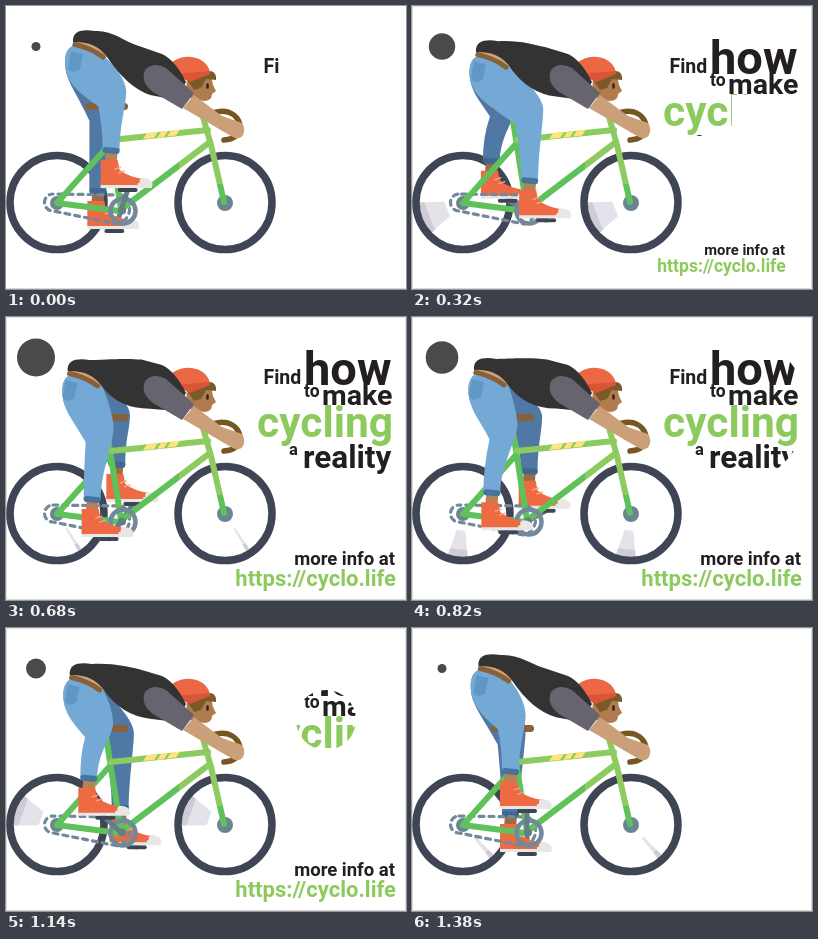
Animation, 400 px wide and 283 px high, one loop 1420 ms. Source, as an HTML page:

```html
<!DOCTYPE html>
<html lang="en">
<head>
<meta charset="utf-8">
<title>Cycling</title>
<style>
html, body { margin: 0; width: 100%; height: 100%; overflow: hidden; background: #fff; }
svg { display: block; width: 100vw; height: 100vh; }
text { font-family: Roboto, "Open Sans", sans-serif; font-weight: 700; fill: #231f20; }
.green { fill: #8dca5e; }
.line { fill: none; stroke-linecap: round; stroke-linejoin: round; }
</style>
</head>
<body>
<svg viewBox="0 0 400 283">
  <defs>
    <linearGradient id="tubePaint" gradientUnits="userSpaceOnUse" x1="113" y1="0" x2="204" y2="0">
      <stop offset=".66" stop-color="#5fc15a"/><stop offset=".66" stop-color="#8dcb60"/>
    </linearGradient>
    <linearGradient id="forkPaint" gradientUnits="userSpaceOnUse" x1="0" y1="110" x2="0" y2="197">
      <stop offset=".78" stop-color="#8dcb60"/><stop offset=".78" stop-color="#5fc15a"/>
    </linearGradient>
    <clipPath id="reveal"><path id="revealShape"/></clipPath>
    <g id="wheel">
      <g class="flap">
        <path d="M17-8L43-18Q47 0 43 18L17 8Z" fill="#e4e3ea"/>
        <path d="M36-15.500L43-18Q47 0 43 18L36 15.500Z" fill="#d0ccd6"/>
      </g>
      <circle r="47" fill="none" stroke="#3f4554" stroke-width="7.5"/>
    </g>
    <g id="shoe">
      <path d="M-25-28h17l2 10q9 7 24 9l2 5h-45z" fill="#ee6a43"/>
      <path d="M-25-5h39q-1-5 4-5q8 1 9 6l-1 4h-51z" fill="#e9e6e6"/>
      <path d="M-25-6h37v3h-37z" fill="#ee6a43"/>
      <path class="line" d="M-11-19l6-2M-7-15l6-2" stroke="#f6a78c" stroke-width="1.3"/>
    </g>
    <path id="crank" class="line" d="M0 0V-21" stroke="#647d89" stroke-width="5"/>
    <path id="pedal" class="line" d="M-8 0H8" stroke="#3f4554" stroke-width="4"/>
  </defs>
  <rect width="400" height="283" fill="#fff"/>
  <path d="M0 282.5H400" stroke="#d8d8d8"/>
  <path id="edge" d="M.5 283V.5H399.5V283" fill="none" stroke="#dcdcdc"/>
  <circle id="badge" cx="30" cy="40.5" fill="#4a4a4a"/>

  <use href="#wheel" x="51" y="196.5"/>
  <use href="#wheel" x="219" y="196.5"/>

  <path id="farSkin" class="line" stroke="#9c6a43" stroke-width="12"/>
  <path id="farLeg" fill="#5078a4"/>
  <path id="farCuff" class="line" stroke="#3f678f" stroke-width="6"/>
  <use id="farCrank" href="#crank"/>
  <use id="farPedal" href="#pedal"/>
  <use id="farShoe" href="#shoe"/>

  <path id="chain" class="line" d="M47 188L116 189A16 16 0 0 1 112 218L47 205A8.5 8.5 0 0 1 47 188" stroke="#71899a" stroke-width="3.2" stroke-dasharray="5 5"/>
  <g fill="#6c8492"><circle cx="51" cy="197" r="7"/><circle cx="219" cy="197" r="8"/></g>
  <g class="line" stroke="#5fc15a" stroke-width="6">
    <path d="M99 102L115 203M103 139L51 197L113 205"/>
    <path d="M113 205L204 136" stroke="url(#tubePaint)"/>
    <path d="M105 134L202 124" stroke="#8dcb60"/>
    <path d="M197 111L205 139L218 196" stroke="url(#forkPaint)"/>
  </g>
  <path d="M141 127l11-1-4 6-11 1zM155 126l7-1-4 6-7 1zM165 124.500l9-1-4 6-9 1z" fill="#ffe47d"/>
  <rect x="79" y="97" width="43" height="7" rx="3.500" fill="#87613a"/>
  <circle cx="117" cy="205" r="12.500" fill="none" stroke="#71899a" stroke-width="4.500"/>
  <circle cx="116" cy="204.500" r="4" fill="#647d89"/>
  <use id="nearCrank" href="#crank"/>
  <use id="nearPedal" href="#pedal"/>

  <path class="line" d="M199 111Q211 103 222 106C238 111 239 133 218 134" stroke="#765721" stroke-width="5.500"/>

  <path id="nearSkin" class="line" stroke="#b98055" stroke-width="12"/>
  <use id="nearShoe" href="#shoe"/>
  <path id="back" fill="#d2a174"/>
  <path id="nearLeg" fill="#74a9d6"/>
  <path id="nearCuff" class="line" stroke="#45759f" stroke-width="6"/>
  <path id="pocket" fill="#5f97c6"/>
  <path id="belt" class="line" stroke="#87613a" stroke-width="5"/>

  <path d="M181 70L205 69L207 79L210 85L206 88Q206 95 198 95L180 91Z" fill="#b07b4d"/>
  <path d="M182 75L205 65Q211 67 210 74L200 73L195 82L188 84Z" fill="#7a5a28"/>
  <path class="line" d="M201.500 78.500v3" stroke="#2e2620" stroke-width="2.500"/>
  <path d="M162 62C168 47 199 46 204 66L183 74Z" fill="#ec6743"/>
  <path d="M168 68L204 65V68L184 76Z" fill="#d95535"/>
  <path id="shirt" fill="#333"/>
  <path d="M188 89L216 110L236 117Q240 123 237 129Q233 135 225 130L177 102Z" fill="#cba079"/>
  <path d="M139 64Q147 55 160 62L188 87L176 103L147 86Q134 76 139 64Z" fill="#67636f"/>

  <g clip-path="url(#reveal)">
    <text x="257.500" y="66.500" font-size="19.500">Find</text>
    <text x="298" y="68" font-size="47">how</text>
    <text x="298" y="80" font-size="17.500">to</text>
    <text x="316" y="88" font-size="28.500">make</text>
    <text x="251" y="120" font-size="42.500" class="green">cycling</text>
    <text x="283" y="138" font-size="16.500">a</text>
    <text x="297" y="151" font-size="31.500">reality</text>
  </g>
  <g id="info" text-anchor="end">
    <text x="389" y="248" font-size="18.500">more info at</text>
    <text x="390" y="269" font-size="22" class="green">https://cyclo.life</text>
  </g>
</svg>
<script>
const LOOP = 1420;
const el = {};
document.querySelectorAll('[id]').forEach(n => el[n.id] = n);
const flap = document.querySelector('.flap');
const set = (id, name, value) => el[id].setAttribute(name, value);
const clamp = (v, lo, hi) => Math.min(hi, Math.max(lo, v));

// piecewise linear tracks: [time, value]
const track = {
  crank: [[0, 18], [200, 82], [480, 164], [680, 215], [940, 262], [1140, 313], [1380, 360], [LOOP, 378]],
  drop: [[0, 0], [200, 5], [480, 17], [680, 18], [940, 16], [1140, 11], [1380, 2], [LOOP, 0]],
  badge: [[0, 4.5], [200, 10], [480, 17.5], [620, 19], [680, 19], [940, 14], [1140, 10], [1380, 4.5], [LOOP, 4.5]],
  info: [[0, 0], [400, 1], [1150, 1], [1350, 0], [LOOP, 0]],
  // half a loop
  spin: [[0, 75], [215, 118], [430, 200], [480, 221], [680, 418], [710, 435]],
  fold: [[0, 0], [120, .6], [200, 1], [480, .9], [680, .1], [690, 0]]
};

function at(keys, t) {
  let i = 1;
  while (i < keys.length - 1 && t > keys[i][0]) i++;
  const [t0, a] = keys[i - 1], [t1, b] = keys[i];
  return a + (b - a) * clamp((t - t0) / (t1 - t0), 0, 1);
}

// 40 ms steps, with three longer holds in the middle
function hold(t) {
  if (t >= 560 && t < 740) return 560 + Math.floor((t - 560) / 60) * 60;
  const from = t < 560 ? 0 : 740;
  return from + Math.floor((t - from) / 40) * 40;
}

function leg(side, deg, drop) {
  const a = deg * Math.PI / 180;
  const px = 115 + 21.5 * Math.sin(a), py = 204.5 - 21.5 * Math.cos(a);
  const hx = 79 - drop * .15, hy = 53 + drop;
  const ax = px - 17, ay = py - 39;
  const kx = hx * .64 + ax * .36 + 14 + Math.max(0, ax - 98) * .6;
  const ky = hy * .64 + ay * .36;
  set(side + 'Crank', 'transform', `translate(115 204.5) rotate(${deg})`);
  set(side + 'Pedal', 'transform', `translate(${px} ${py})`);
  set(side + 'Shoe', 'transform', `translate(${px - 2} ${py - 2})`);
  set(side + 'Skin', 'd', `M${ax + 1} ${ay}L${ax} ${ay + 13}`);
  set(side + 'Cuff', 'd', `M${ax - 5} ${ay - 1}L${ax + 6} ${ay}`);
  set(side + 'Leg', 'd', `M${hx - 20} ${hy + 3}
    Q${hx - 20} ${hy - 11} ${hx - 10} ${hy - 14}
    L${hx + 20} ${hy - 2}
    Q${kx + 13} ${ky - 16} ${kx + 14} ${ky - 1}
    C${kx + 14} ${ky + 14} ${ax + 9} ${ay - 28} ${ax + 9} ${ay}
    L${ax - 8} ${ay - 1}
    Q${ax - 8} ${ay - 25} ${kx - 14} ${ky + 14}
    C${hx - 9} ${hy + 32} ${hx - 20} ${hy + 22} ${hx - 20} ${hy + 3}Z`);
}

function body(d) {
  const x = -d * .3;
  set('shirt', 'd', `M${67 + x} ${36 + d}
    C${66 + x} ${24 + d} ${78 + x} ${23 + d} ${89 + x} ${25 + d}
    C${106 - x} ${24 + d} ${118 - x} ${35 + d * .35} ${130 - x} ${39 + d * .2}
    L156 48Q169 54 180 76L170 94L144 ${89 + d * .15}
    Q${121 + 1.6 * x} ${81 + d * .6} ${101 + x} ${51 + d}
    Q${90 + x} ${35 + d} ${67 + x} ${36 + d}Z`);
  set('back', 'd', `M${68 + x} ${35 + d}L${87 + x} ${34 + d}L${101 + x} ${50 + d}L${97 + x} ${54 + d}L${66 + x} ${40 + d}Z`);
  set('belt', 'd', `M${69 + x} ${38.5 + d}Q${85 + x} ${42 + d} ${97 + x} ${51 + d}`);
  set('pocket', 'd', `M${65 + x} ${45 + d}L${77 + x} ${48 + d}L${74 + x} ${63 + d}Q${66 + x} ${69 + d} ${62 + x} ${62 + d}Z`);
}

const box = (x, y, w, h) => w > 0 && h > 0 ? `M${x} ${y}h${w}v${h}h${-w}z` : '';

function star(x, y, r) {
  if (r <= 0) return '';
  const pts = Array.from({ length: 10 }, (_, i) => {
    const a = i * Math.PI / 5 - Math.PI / 2, s = i % 2 ? r * .5 : r;
    return `${x + s * Math.cos(a)} ${y + s * Math.sin(a)}`;
  });
  return `M${pts.join('L')}Z`;
}

// words wipe in one by one, then a circle closes over them
function reveal(t) {
  if (t >= 640) {
    const r = t < 700 ? 120 : Math.max(0, 30 + (1140 - t) * .14);
    return r ? `M${320 - r} 92a${r} ${r} 0 1 0 ${2 * r} 0a${r} ${r} 0 1 0 ${-2 * r} 0` : '';
  }
  return box(256, 45, Math.min(41, 17 + t * .3), 26)
    + box(297, 28, t >= 80 ? 95 : 0, Math.min(61, 52 + (t - 200) * .38))
    + box(248, 87, Math.min(144, (t - 240) * .9), 43)
    + box(280, 124, t >= 440 ? 14 : 0, 16)
    + star(343, 144, 11 + (t - 480) * .9);
}

function draw(t) {
  const deg = at(track.crank, t), drop = at(track.drop, t), half = t % (LOOP / 2);
  leg('near', deg, drop);
  leg('far', deg + 180, drop);
  body(drop);
  flap.setAttribute('transform', `rotate(${at(track.spin, half)}) scale(1 ${at(track.fold, half)})`);
  set('chain', 'stroke-dashoffset', -deg * 10 / 36);
  set('badge', 'r', at(track.badge, t));
  set('info', 'transform', `translate(308.5 255) scale(${at(track.info, t)}) translate(-308.5 -255)`);
  set('edge', 'opacity', t >= 240 ? 1 : 0);
  set('revealShape', 'd', reveal(t));
}

const start = performance.now();
function tick(now) {
  draw(hold(Math.max(0, now - start) % LOOP));
  requestAnimationFrame(tick);
}
draw(0);
requestAnimationFrame(tick);
</script>
</body>
</html>
```
